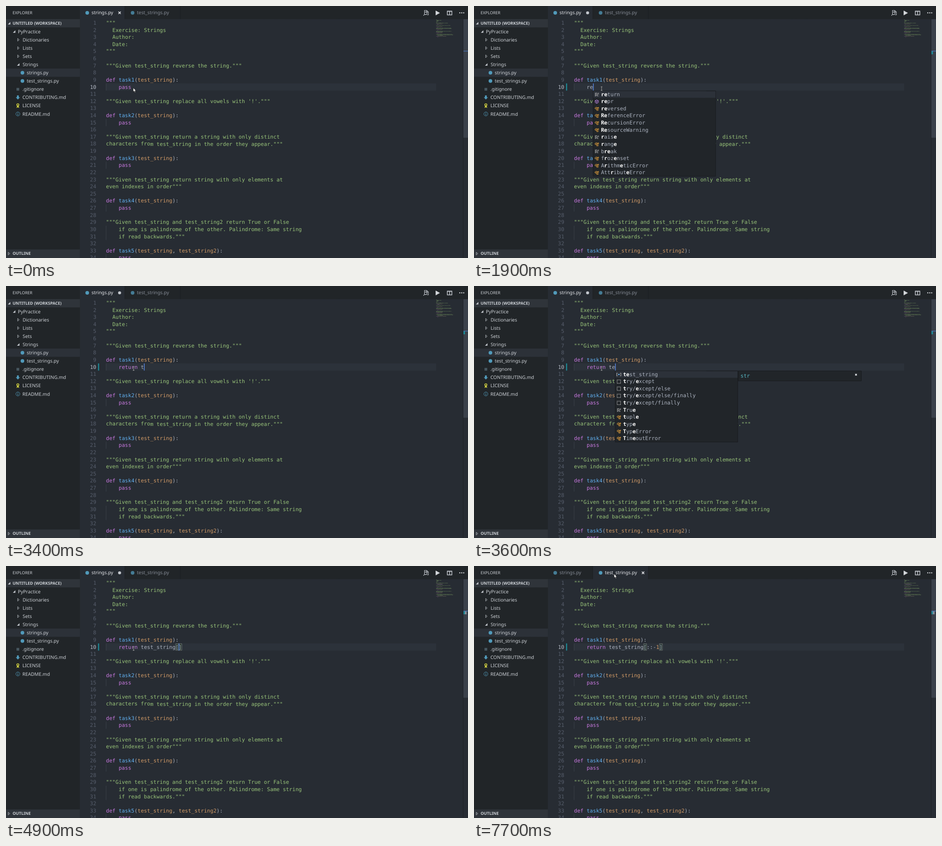
These frames come from a looping animation (1013x553 px, 8 s). An HTML page:

```html
<!DOCTYPE html>
<html lang="en">
<head>
<meta charset="utf-8">
<title>Editor</title>
<style>
  html, body { margin: 0; width: 100%; height: 100%; overflow: hidden; background: #272c33; }
  svg { display: block; width: 1013px; height: 553px; }
  text { white-space: pre; text-rendering: geometricPrecision; }
  .code { font: 11.5px "DejaVu Sans Mono", monospace; fill: #abb2bf; }
  .num { fill: #565d6b; text-anchor: end; }
  .now { fill: #b4bac5; }
  .ui { font: 10.35px "Noto Sans", "Open Sans", sans-serif; fill: #ccd0d5; }
  .head { font-size: 8.95px; }
  .b { font-weight: bold; fill: #fff; }
  .str { fill: #98c379; }
  .kw { fill: #c678dd; }
  .fn { fill: #61afef; }
  .arg { fill: #d19a66; }
  .type { fill: #56b6c2; }
  .line { fill: none; stroke: #c5c9cf; stroke-width: 1.1; }
  .x { fill: none; stroke: #e2e4e8; stroke-width: 1.6; }
  .pop { fill: #212529; stroke: #181a1e; stroke-width: .9; }
</style>
</head>
<body>
<svg viewBox="0 0 1013 553">
  <rect width="1013" height="553" fill="#272c33"/>
  <!-- The tiny turn keeps text baselines from snapping to whole pixels. -->
  <g transform="rotate(.02 400 270)">
    <g id="editor"></g>
    <g id="sidebar"></g>
    <g id="tabs"></g>
  </g>
  <g id="tools">
    <g class="line">
      <path d="M917.500 13V9.700h5l3.500 3.300V19.500h-2.500M922.300 9.700v3.500h3.500"/>
      <circle cx="920.300" cy="16" r="2.900"/>
      <path d="M918.200 18.200l-3 2.800"/>
      <path d="M967.600 11.200h10v8.300h-10zM972.600 11v8.500M967.600 11.700h10" stroke-width="1.500"/>
    </g>
    <path d="M942 10l9.500 5.200-9.500 5.200z" fill="#d3d6da"/>
    <g fill="#d3d6da"><circle cx="995" cy="15" r="1.300"/><circle cx="999.300" cy="15" r="1.300"/><circle cx="1003.600" cy="15" r="1.300"/></g>
  </g>
  <g id="ruler">
    <rect x="1002.500" y="29" width="10.500" height="260" fill="#3a404a"/>
    <path d="M1002.300 29V553" stroke="#1d2024" stroke-width=".8"/>
    <rect id="modMark" x="1003" y="99" width="3.300" height="7" fill="#1d8a96"/>
    <rect id="pairMark" x="1006.300" y="99" width="3.500" height="7" fill="#8a93a0"/>
    <rect x="1003" y="98.300" width="10" height="1.300" fill="#4a74b8"/>
  </g>
  <rect id="gutter" x="201.800" y="169.900" width="2.400" height="15.600" fill="#1d8a96"/>
  <g transform="rotate(.02 400 270)">
    <g id="live"></g>
    <g id="popup"></g>
  </g>
  <rect id="caret" y="169.900" width="1.400" height="15.600" fill="#5b8def"/>
  <path id="arrow" d="M0 0V8.800L2.100 7L3.500 10.200L5 9.500L3.600 6.500H6.200Z" fill="#fff" stroke="#111" stroke-width=".7"/>
  <g id="beam" fill="none">
    <path d="M-1.800-4H1.800M0-4V4M-1.800 4H1.800" stroke="#15181c" stroke-width="1.700"/>
    <path d="M-1.800-4H1.800M0-4V4M-1.800 4H1.800" stroke="#dcdcdc" stroke-width=".8"/>
  </g>
</svg>
<script>
const $ = id => document.getElementById(id);
const CW = 6.923, LH = 15.62, TOP = 29.4, LEFT = 219.3;
const colX = col => LEFT + col * CW;
const rowY = row => TOP + row * LH;
const show = (id, on) => $(id).setAttribute('visibility', on ? 'visible' : 'hidden');
const rect = (x, y, w, h, fill) => `<rect x="${x}" y="${y}" width="${w}" height="${h}" fill="${fill}"/>`;
const text = (x, y, cls, body) => `<text x="${x}" y="${y}" class="${cls}">${body}</text>`;
const span = (cls, s) => `<tspan class="${cls}">${s}</tspan>`;
const cross = (x, y, r) => `<path class="x" d="M${x - r} ${y - r}l${2 * r} ${2 * r}m0 ${-2 * r}l${-2 * r} ${2 * r}"/>`;
const dot = (x, y, o = 1) => `<circle cx="${x}" cy="${y}" r="4" fill="#519aba" opacity="${o}"/>`;

const lines = `"""
  Exercise: Strings
  Author:
  Date:
"""

"""Given test_string reverse the string."""

def task1(test_string):
    pass

"""Given test_string replace all vowels with '!'."""

def task2(test_string):
    pass

"""Given test_string return a string with only distinct
characters from test_string in the order they appear."""

def task3(test_string):
    pass

"""Given test_string return string with only elements at
even indexes in order"""

def task4(test_string):
    pass

"""Given test_string and test_string2 return True or False
    if one is palindrome of the other. Palindrome: Same string
    if read backwards."""

def task5(test_string, test_string2):
    pass`.split('\n');

function paint(s) {
  if (s === 'pass') return span('kw', s);
  if (!s.startsWith('def ')) return span('str', s);
  return s.replace(/test_string2?/g, m => span('arg', m))
    .replace(/task\d/, m => span('fn', m))
    .replace(/^def/, span('kw', 'def'));
}

const mini = (col, row, len, tint) =>
  `<rect x="${943 + col * .6}" y="${29.9 + row * 1.13}" width="${len * .6}" height=".8" fill="${tint}" opacity=".65"/>`;

function drawEditor() {
  let out = rect(LEFT, 169.9, 943 - LEFT, LH, '#2c323a');
  lines.forEach((line, i) => {
    const body = line.trim(), pad = line.length - line.trimStart().length;
    const y = rowY(i), base = y + 11.6, live = i === 9;
    out += text(198, base, 'code num', live ? span('now', i + 1) : i + 1);
    if (pad === 4) out += rect(219, y, .8, LH, '#40464f');
    if (!body || live) return;
    out += text(colX(pad), base, 'code', paint(body));
    for (const m of line.matchAll(/\S+/g)) {
      const tint = body === 'pass' || m[0] === 'def' ? '#7d5590' : body.startsWith('def') ? '#7f7564' : '#74935f';
      out += mini(m.index, i, m[0].length, tint);
    }
  });
  $('editor').innerHTML = out;
}

const closed = (x, y) => `<path d="M${x - 1.5} ${y - 3}l3.400 3-3.400 3z" fill="none" stroke="#b9bec5" stroke-width=".9"/>`;
const opened = (x, y) => `<path d="M${x + 2.5} ${y - 2.8}v5.500h-5.500z" fill="#c5c9cf"/>`;

function drawSidebar() {
  const rows = [
    ['PyPractice', 18, opened], ['Dictionaries', 27, closed], ['Lists', 27, closed],
    ['Sets', 27, closed], ['Strings', 27, opened], ['strings.py', 36, dot],
    ['test_strings.py', 36, dot],
    ['.gitignore', 26, (x, y) => rect(x - 3, y - 3, 6, 6, '#46565e')],
    ['CONTRIBUTING.md', 26, (x, y) => `<path d="M${x - 2} ${y - 4.5}h4v4h2.600l-4.600 5-4.600-5h2.600z" fill="#519aba"/>`],
    ['LICENSE', 26, (x, y) => `<circle cx="${x}" cy="${y - 2}" r="2.300" fill="none" stroke="#cbcb41" stroke-width="1.700"/><path d="M${x - 1.5} ${y}l-1.500 5 3-1.500 3 1.500-1.500-5z" fill="#cbcb41"/>`],
    ['README.md', 26, (x, y) => `<circle cx="${x}" cy="${y}" r="4.300" fill="none" stroke="#519aba" stroke-width=".9"/><path d="M${x} ${y - 2.6}v1.200m0 1v3" stroke="#519aba" stroke-width="1.200"/>`]
  ];
  let out = rect(-1, -1, 163, 555, '#212528') + rect(-1, 28.8, 163, 18.2, '#2f343a')
    + rect(-1, 137.4, 163, 18.1, '#2c3138') + rect(-1, 534.3, 163, 20, '#2f343a')
    + text(14.5, 18.1, 'ui head', 'EXPLORER')
    + opened(7, 38) + text(14.5, 41, 'ui head', '<tspan font-weight="bold">UNTITLED (WORKSPACE)</tspan>')
    + closed(6.5, 543.5) + text(14.5, 546.6, 'ui head', '<tspan font-weight="bold">OUTLINE</tspan>');
  rows.forEach(([name, x, icon], i) => {
    const y = 56.2 + i * 18.08;
    out += icon(x, y, 1) + text(x + (x === 18 ? 8 : x === 26 ? 10 : 9.5), y + 3.7, 'ui', name);
  });
  $('sidebar').innerHTML = out;
}

function tabs(second, dirty) {
  const label = (x, name, on) => dot(x, 15, on ? 1 : .75)
    + text(x + 9.5, 18.5, 'ui', `<tspan fill="${on ? '#e3e5e9' : '#858b95'}">${name}</tspan>`);
  return rect(162, -1, 852, 29.8, '#212528')
    + (second ? rect(260.5, -1, 121.5, 30, '#272c33') : rect(162, -1, 98.5, 30, '#272c33'))
    + rect(260, 0, .8, 28.8, '#1b1e22') + rect(381.8, 0, .8, 28.8, '#1b1e22')
    + label(178, 'strings.py', !second) + label(277.5, 'test_strings.py', second)
    + (second ? cross(370.6, 15, 2.6) : dirty ? '<circle cx="249" cy="15" r="3.300" fill="#c3c7cd"/>' : cross(249, 15, 2.6));
}

// Asterisks enclose the matched letters; the first letter names the icon.
const listRe = ['k*re*turn', 'f*re*pr', 'c*re*versed', 'c*Re*ferenceError', 'c*Re*cursionError', 'c*Re*sourceWarning',
  'k*r*ais*e*', 'c*r*ang*e*', 'kb*re*ak', 'cf*r*oz*e*nset', 'cA*r*ithm*e*ticError', 'cAtt*r*ibut*e*Error'];
const listTe = ['v*te*st_string', 's*t*ry/*e*xcept', 's*t*ry/*e*xcept/else', 's*t*ry/*e*xcept/else/finally', 's*t*ry/*e*xcept/finally',
  'k*T*ru*e*', 'c*t*upl*e*', 'c*t*yp*e*', 'c*T*yp*e*Error', 'c*T*im*e*outError'];
const listTest = ['v*test*_string', 's*t*ry/*e*xcep*t*/el*s*e', 's*t*ry/*e*xcep*t*/el*s*e/finally'];

function icon(kind, x, y) {
  const d = {
    k: 'M-4-3h5m1.500 0h2M-4-1h3m1.500 0h4M-4 1h6M-4 3h3m1.500 0h3',
    f: 'M-3.500-2l3.500-1.800 3.500 1.800v4L0 3.800-3.500 2zM-3.500-2L0 0l3.500-2M0 0v3.800',
    c: 'M-4-1l3-2.500 2 2-3 2.500zM0 1h3v2.500h-3zM2-3h2v2h-2z',
    v: 'M-3-3h-1.500v6H-3M3-3h1.500v6H3',
    s: 'M-3.800-3.800h7.600v7.600h-7.600z'
  }[kind];
  const tint = { c: '#d99a3c', f: '#b180d7' }[kind] || '#c5c5c5';
  return `<g transform="translate(${x} ${y})"><path d="${d}" fill="none" stroke="${tint}"${kind === 's' ? ' stroke-dasharray="1.500 .8"' : ''}/>`
    + (kind === 'v' ? '<path d="M-2 0l2-1.700 2.300 1.200-2.300 2z" fill="#75beff"/>' : '') + '</g>';
}

function popup(list, col, doc) {
  const x = colX(col) + .3, y = 186.2;
  let out = `<rect class="pop" x="${x}" y="${y}" width="268.700" height="${list.length * LH}"/>`
    + rect(x + .5, y + .4, 267.8, LH - .8, '#2c3139');
  list.forEach((item, i) => {
    const body = item.slice(1).split('*').map((s, j) => j % 2 ? span('b', s) : s).join('');
    out += icon(item[0], x + 8, y + 8 + i * LH) + text(x + 17.3, y + 11.4 + i * LH, 'code', body);
  });
  if (doc) out += `<rect class="pop" x="${x + 269.7}" y="${y}" width="270" height="22"/>`
    + text(x + 274.6, y + 14.6, 'code', span('type', 'str')) + cross(x + 528, 194.5, 1.8);
  return out;
}

const word = 'return test_string';
// The last entry only restarts the caret's blinking.
const keys = [[-600, 'pass'], [1300, ''], [1700, 'r'], [1900, 're'], [2100, 'retu'], [2500, 'return'], [3100, 'return '],
  [3400, 'return t'], [3500, 'return te'], [3700, 'return tes'], [3800, 'return test'], [4000, word],
  [4900, word + '[]'], [5300, word + '[:]'], [5700, word + '[::]'], [5900, word + '[::-]'],
  [6000, word + '[::-1]'], [6100, word + '[::-1]']];

function popupAt(t) {
  if (t >= 1900 && t < 2100) return popup(listRe, 6);
  if (t >= 2100 && t < 2600) return popup([t < 2500 ? 'k*retu*rn' : 'k*return*'], 8);
  if (t >= 3600 && t < 3700) return popup(listTe, 13, true);
  if (t >= 3700 && t < 4000) return popup(listTest, t < 3800 ? 14 : 15, true);
  return '';
}

function liveLine(t, code) {
  let out = '';
  if (code.includes('[')) {
    const end = code.length - (t >= 5300 && t < 5400 ? 2 : 1);
    for (const col of [word.length, end])
      out += `<rect x="${colX(4 + col) + .4}" y="170.400" width="6.500" height="14.600" fill="#006400" fill-opacity=".1" stroke="#7f847f" stroke-width=".8"/>`;
  }
  let body = code.replace(/return|pass/, m => span('kw', m));
  if (t >= 6200) body = body.replace('-1', '-' + span('arg', '1'));
  return out + text(colX(4), rowY(9) + 11.6, 'code', body) + mini(4, 9, code.length, '#7c7288');
}

function pointer(t) {
  const p = Math.min(1, Math.max(0, (t - 7100) / 500));
  const e = p * p * (3 - 2 * p);
  const x = 279.8 + 27.4 * e, y = 181.2 - 164 * e;
  const arrow = t < 100 || y < 29;
  show('arrow', arrow);
  show('beam', !arrow);
  $('arrow').setAttribute('transform', t < 100 ? 'translate(279 179.500)' : `translate(${x} ${y})`);
  $('beam').setAttribute('transform', `translate(${x} ${y})`);
}

let last = -1;
function draw(t) {
  if (t === last) return;
  last = t;
  const [since, code] = keys.filter(k => k[0] <= t).pop();
  const col = 4 + code.length - (code.endsWith(']') ? 1 : 0);
  $('live').innerHTML = liveLine(t, code);
  $('popup').innerHTML = popupAt(t);
  $('tabs').innerHTML = tabs(t >= 7700, t >= 1300 && t < 7000);
  $('caret').setAttribute('x', colX(col) + .1);
  show('caret', Math.floor((t - since) / 500) % 2 === 0);
  show('gutter', t >= 1500);
  show('modMark', t >= 1500);
  show('pairMark', t >= 4900);
  pointer(t);
}

drawEditor();
drawSidebar();
// The screen updates ten times a second.
function tick() {
  draw(Math.floor(performance.now() % 8000 / 100) * 100);
  requestAnimationFrame(tick);
}
tick();
</script>
</body>
</html>
```
